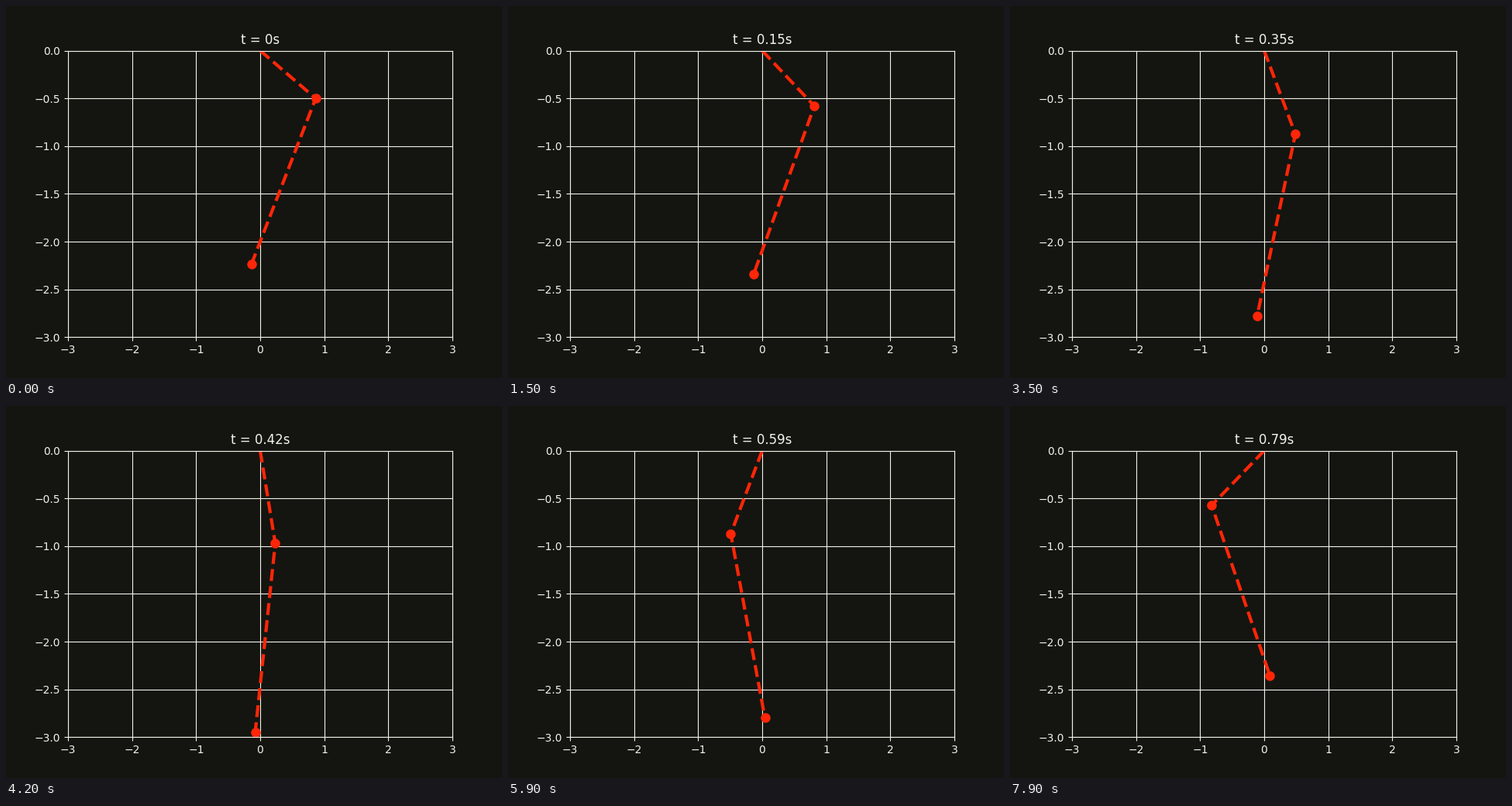
Recreate the animation shown at these times as a matplotlib script. Size 640 by 480 pixels, loop 8 s.

```python
import numpy as np
import matplotlib.pyplot as plt
from matplotlib.animation import FuncAnimation

BG, FG, RED = "#141510", "#f2f2ea", "#ff2608"
G, L1, L2, M1, M2 = 9.8, 1.0, 2.0, 1.0, 1.0
FRAMES, DT, SUBSTEPS = 80, 0.01, 4


def deriv(state):
    """Double pendulum: state is (angle 1, angle 2, speed 1, speed 2)."""
    a, b, wa, wb = state
    mu = M2 / (M1 + M2)
    s, c = np.sin(a - b), np.cos(a - b)
    acc_a = (-G * np.sin(a) - mu * s * (L2 * wb**2 + c * L1 * wa**2)
             + mu * c * G * np.sin(b)) / (L1 * (1 - mu * c**2))
    acc_b = (L1 * (s * wa**2 - c * acc_a) - G * np.sin(b)) / L2
    return np.array([wa, wb, acc_a, acc_b])


def rk4(y, h):
    k1 = deriv(y)
    k2 = deriv(y + h / 2 * k1)
    k3 = deriv(y + h / 2 * k2)
    k4 = deriv(y + h * k3)
    return y + h / 6 * (k1 + 2 * k2 + 2 * k3 + k4)


def solve():
    y = np.array([np.pi / 3, -np.pi / 6, 0.0, 0.0])
    path = [y]
    for _ in range(FRAMES - 1):
        for _ in range(SUBSTEPS):
            y = rk4(y, DT / SUBSTEPS)
        path.append(y)
    return np.array(path)


angles = solve()[:, :2]
x1, y1 = L1 * np.sin(angles[:, 0]), -L1 * np.cos(angles[:, 0])
x2, y2 = x1 + L2 * np.sin(angles[:, 1]), y1 - L2 * np.cos(angles[:, 1])

plt.rcParams.update({
    "font.family": "DejaVu Sans", "text.color": FG, "axes.edgecolor": FG,
    "xtick.color": FG, "ytick.color": FG, "grid.color": FG,
})
fig, ax = plt.subplots(figsize=(6.4, 4.8), dpi=100, facecolor=BG)
ax.set_facecolor(BG)
ax.set(xlim=(-3, 3), ylim=(-3, 0))
ax.grid(True)
title = ax.set_title("")
rods, = ax.plot([], [], "--", color=RED, lw=3)
bobs, = ax.plot([], [], "o", color=RED, ms=8)


def draw(i):
    rods.set_data([0, x1[i], x2[i]], [0, y1[i], y2[i]])
    bobs.set_data([x1[i], x2[i]], [y1[i], y2[i]])
    title.set_text(f"t = {i * DT:.4g}s")
    return rods, bobs, title


anim = FuncAnimation(fig, draw, frames=FRAMES, interval=100,
                     repeat=True, repeat_delay=0)
plt.show()
```
